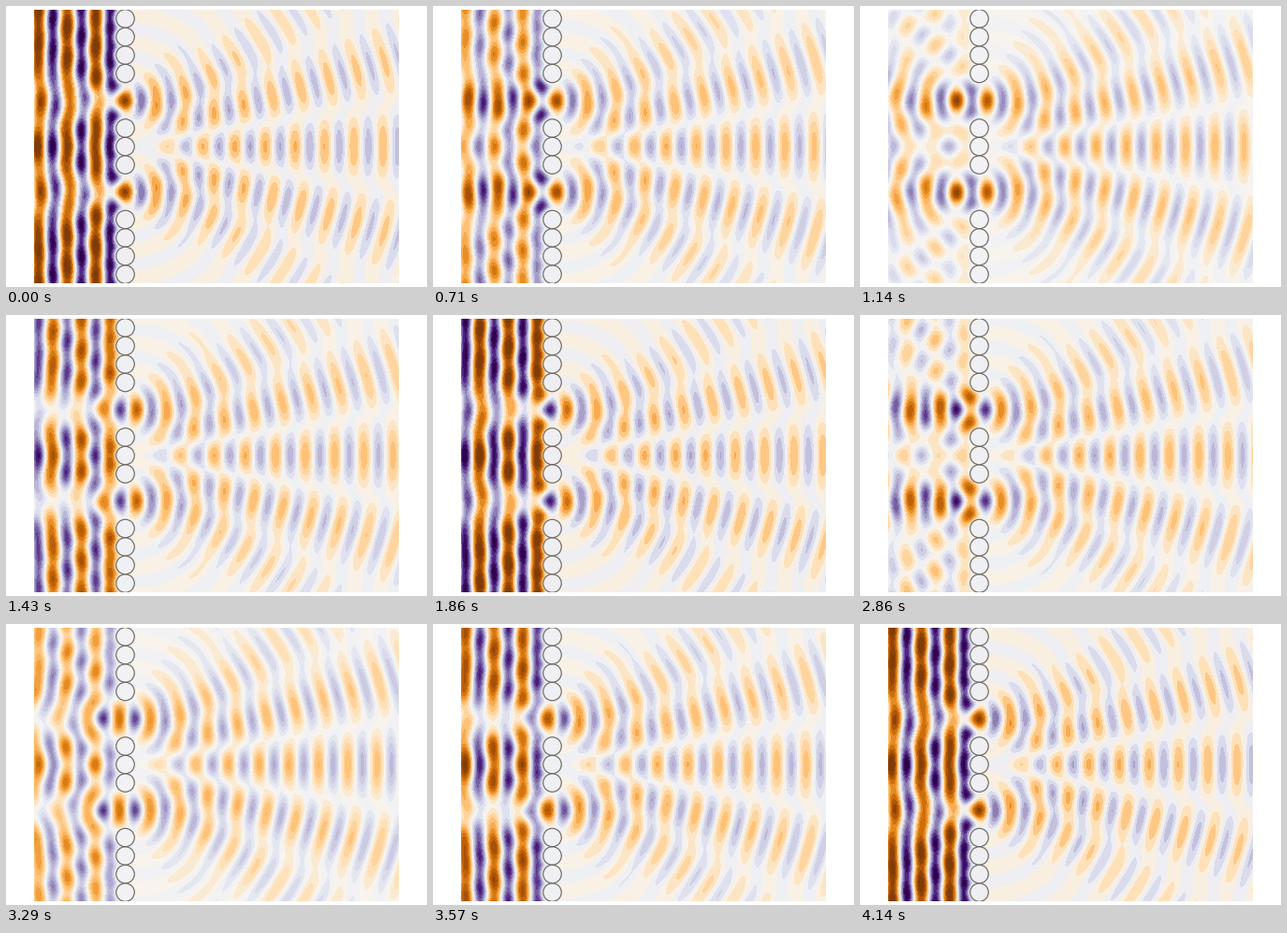
Recreate the animation shown at these times as a matplotlib script. Size 450 px wide and 300 px high, loop 4.28 s.

```python
import numpy as np
import matplotlib.pyplot as plt
from matplotlib.animation import FuncAnimation
from matplotlib.patches import Circle

# Plane wave hitting a wall of sound-soft cylinders with two slits.
K = 4.0                 # wave number
RADIUS = 0.5
LIMIT = 2.0             # colour scale runs over +-LIMIT
FRAMES = 30
LOOP_MS = 4280
W, H, DPI = 450, 300, 100

# Smooth envelope g(z) of the Hankel function H0(z) = g(z) exp(iz)
Z = np.geomspace(0.05, 300, 4000)
S = np.arange(0, 5.5, 0.03)
weight = np.exp(-S**2) * 0.03
weight[0] /= 2
ENVELOPE = (np.sqrt(8 / Z) / np.pi * np.exp(-0.25j * np.pi)
            * ((1 + 0.5j * S**2 / Z[:, None]) ** -0.5 @ weight))


def hankel0(z):
    return np.interp(z, Z, ENVELOPE) * np.exp(1j * z)


def ring(cy, radius, count):
    a = (np.arange(count) + 0.5) * 2 * np.pi / count
    return radius * np.cos(a), cy + radius * np.sin(a)


def kernel(px, py, sx, sy):
    """Field at points p of unit sources at s and their mirror images."""
    dx = px[:, None] - sx
    direct = np.hypot(dx, py[:, None] - sy)
    mirrored = np.hypot(dx, py[:, None] + sy)
    return hankel0(K * direct) + hankel0(K * mirrored)


def solve_field(gx, gy, centres):
    """Total complex field on the upper half grid, zero inside cylinders."""
    rim = [ring(c, RADIUS, 22) for c in centres]
    src = [ring(c, 0.64 * RADIUS, 14) for c in centres]
    bx, by = np.concatenate(rim, axis=1)
    sx, sy = np.concatenate(src, axis=1)
    coef = np.linalg.lstsq(kernel(bx, by, sx, sy), -np.exp(1j * K * bx),
                           rcond=1e-9)[0].reshape(len(centres), -1)
    px, py = gx.ravel(), gy.ravel()
    u = np.exp(1j * K * px)
    for (qx, qy), c in zip(src, coef):
        u += kernel(px, py, qx, qy) @ c
    for cy in centres:
        u[np.hypot(px, py - cy) < RADIUS] = 0
    return u.reshape(gx.shape)


x = np.linspace(-5, 15, 201)
y_half = np.linspace(0, 7.5, 76)
wall = np.array([0, 1, *range(4, 41)], float)
upper = solve_field(*np.meshgrid(x, y_half), wall)
field = np.vstack([upper[:0:-1], upper])
y = np.concatenate([-y_half[:0:-1], y_half])

fig = plt.figure(figsize=(W / DPI, H / DPI), dpi=DPI, facecolor="white")
ax = fig.add_axes([30 / W, 3.75 / H, 390 / W, 292.5 / H])
ax.set_xlim(-5, 15)
ax.set_ylim(-7.5, 7.5)
ax.set_autoscale_on(False)
ax.axis("off")

for cy in wall[wall < 7.5]:
    for side in ((1, -1) if cy else (1,)):
        ax.add_patch(Circle((0, side * cy), RADIUS, fill=False, ec="0.42",
                            lw=1.2 * 72 / DPI, zorder=3))


def draw(i):
    for old in list(ax.collections):
        old.remove()
    phase = 2 * np.pi * i / (FRAMES - 1)
    wave = (field * np.exp(-1j * phase)).real
    ax.contourf(x, y, wave, 20, cmap="PuOr_r", vmin=-LIMIT, vmax=LIMIT)
    return ax.collections


anim = FuncAnimation(fig, draw, frames=FRAMES, interval=LOOP_MS / FRAMES,
                     repeat=True, blit=False)
plt.show()
```
